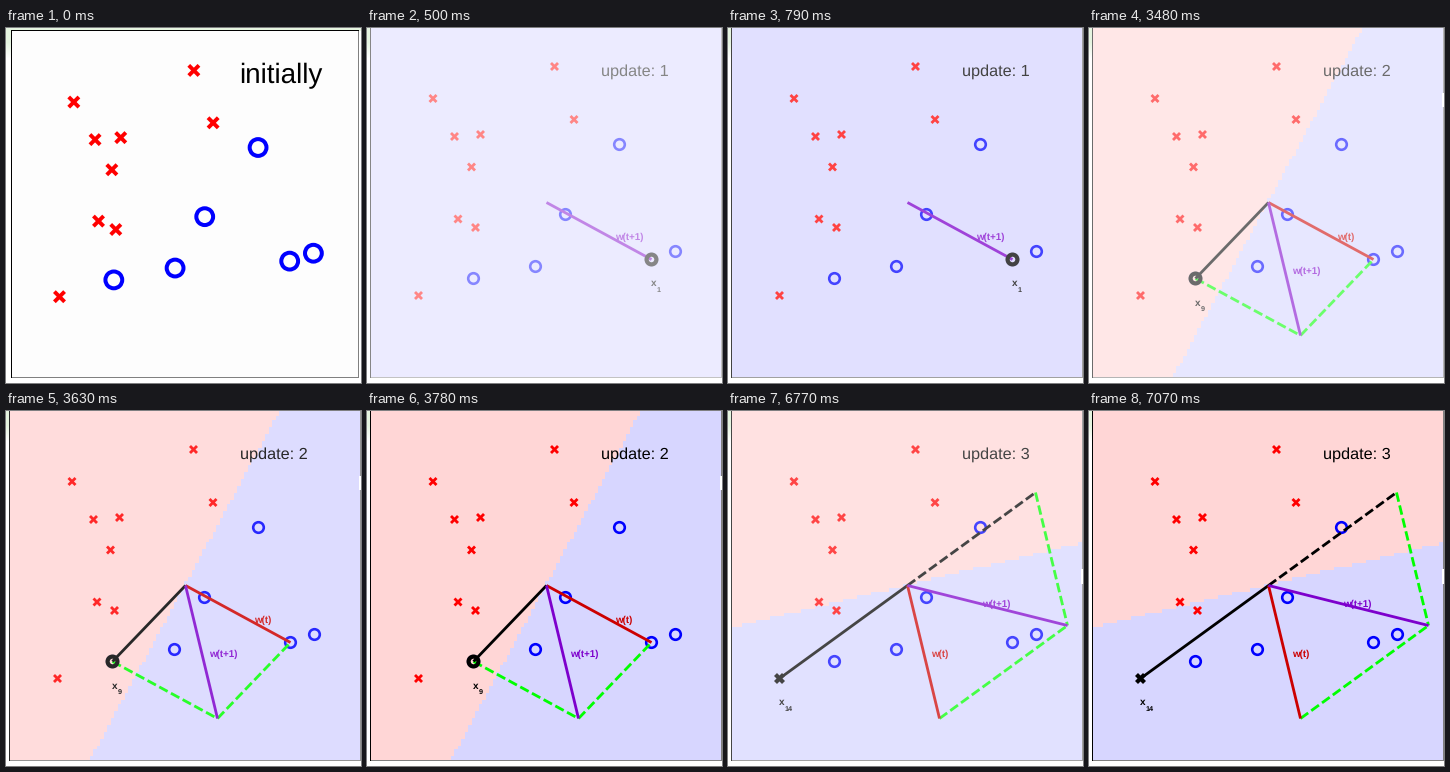
A matplotlib script that plays this animation: 355x355 px, repeating every 8000 ms.

```python
import numpy as np
import matplotlib.pyplot as plt
from matplotlib.animation import FuncAnimation
from matplotlib.collections import LineCollection, EllipseCollection
from matplotlib.patches import Rectangle

plt.rcParams["text.hinting"] = "none"

SIZE, DPI, STEP, LOOP = 355, 71, 20, 8000
PT = 72 / DPI
LINE = 2.8

RED, BLUE, GREEN, BLACK, GREY = "#ff0000", "#0000ff", "#00ff00", "#000000", "#808080"
OLD_W, NEW_W = "#cc0000", "#7d00cc"
MINT = np.array([0.9, 0.96, 0.88])
PINK_AREA, BLUE_AREA = (1, 0.843, 0.843), (0.845, 0.843, 1)

# training samples of the two classes
CROSSES = np.array([(187, 38), (65.5, 70), (87, 108), (113, 106), (104, 138.5),
                    (90.5, 190.5), (108, 199), (206.5, 91), (51, 267)])
RINGS = np.array([(252, 116), (198, 186), (168, 238), (106, 250), (284, 231), (308, 223)])

# perceptron updates: add a misclassified ring, subtract a misclassified cross
ORIGIN = np.array([179, 174])
X1, X9, X14 = RINGS[4], RINGS[3], CROSSES[-1]
W1 = X1
W2 = W1 + X9 - ORIGIN
FLIP14 = 2 * ORIGIN - X14
W3 = W2 + FLIP14 - ORIGIN

# first moment and opacity of each update; the fade climbs in even ticks
FADES = [(500, 0.47), (3480, 0.575), (6620, 0.46)]
TICK, RISE = 150, 0.265

fig = plt.figure(figsize=(SIZE / DPI, SIZE / DPI), dpi=DPI, facecolor="white")
ax = fig.add_axes([0, 0, 1, 1])
ax.set_axis_off()
scenes = [[], [], [], []]


def box(k, x0, y0, x1, y1, color, z=0):
    patch = Rectangle((x0 - 0.5, y0 - 0.5), x1 - x0, y1 - y0, fc=color, lw=0,
                      antialiased=False, zorder=z)
    ax.add_patch(patch)
    if k is not None:
        scenes[k].append(patch)
    return patch


def border(k, left, top, right, bottom=349):
    box(k, left, bottom, right + 1, bottom + 1, GREY, 2)
    box(k, right, top, right + 1, bottom + 1, GREY, 2)
    box(k, left, top, left + 1, bottom + 1, BLACK, 2)


def crosses(k, points, r, width, color=RED, z=3):
    arms = [np.array([(-r, -r), (r, r)]), np.array([(-r, r), (r, -r)])]
    scenes[k].append(ax.add_collection(LineCollection(
        [p + arm for p in points for arm in arms], colors=color,
        linewidths=width * PT, capstyle="butt", zorder=z)))


def rings(k, points, r, width, color=BLUE, z=3):
    d = [2 * r] * len(points)
    scenes[k].append(ax.add_collection(EllipseCollection(
        d, d, [0] * len(points), units="xy", offsets=points,
        offset_transform=ax.transData, facecolors="none", edgecolors=color,
        linewidths=width * PT, zorder=z)))


def line(k, a, b, color, dashed=False):
    style = (0, (9.5 / LINE, 3.8 / LINE)) if dashed else "-"
    scenes[k] += ax.plot(*zip(a, b), color=color, lw=LINE * PT, ls=style, zorder=4,
                         solid_capstyle="butt", dash_capstyle="butt")


def label(k, x, y, text, size, color=BLACK, weight="bold"):
    scenes[k].append(ax.text(x, y, text, fontsize=size * PT, color=color,
                             family="Liberation Sans", weight=weight,
                             va="baseline", ha="left", zorder=6))


def sample_name(k, point, index):
    x, y = point + (-0.5, 27)
    label(k, x, y, "x", 10)
    label(k, x + 5.8, y + 5.3, index, 7.3)


def weight_vector(k, tip, place, text, color):
    line(k, ORIGIN, tip, color)
    label(k, *place, text, 9.7, color)


def area(k, normal=None, cells=100):
    pitch = 351 / cells
    centers = (np.arange(cells) + 0.5) * pitch
    gx, gy = np.meshgrid(centers + 3, centers - 2)
    if normal is None:
        inside = np.ones_like(gx, bool)
    else:
        nx, ny = normal - ORIGIN
        inside = (gx - ORIGIN[0]) * nx + (gy - ORIGIN[1]) * ny > 0
    rgb = np.where(inside[..., None], BLUE_AREA, PINK_AREA)
    scenes[k].append(ax.imshow(rgb, extent=(2.5, 353.5, 348.5, -2.5), aspect="auto",
                               interpolation="nearest", zorder=1))


def update_scene(k, normal=None):
    area(k, normal)
    border(k, 3, 0, 354)
    crosses(k, CROSSES, 3.5, 2.8)
    rings(k, RINGS, 5.3, 2.6)
    label(k, 234, 47, f"update: {k}", 16.2, weight="normal")


# pale green corner fading downwards
fade = np.clip((np.arange(31) - 14) / 16, 0, 1)[:, None, None]
ax.imshow(MINT + (1 - MINT) * fade, extent=(-0.5, 5.5, 30.5, -0.5), aspect="auto", zorder=0)

# initial scene: the same samples, slightly shrunk
box(0, 3, 0, SIZE, 3, MINT)
box(0, 5, 2, 353, 350, "#fdfdfd", 1)
border(0, 5, 2, 352)
box(0, 5, 2, 353, 3, BLACK, 2)
shrink = lambda points: points * 0.988 + (2.6, 4.4)
crosses(0, shrink(CROSSES), 5.1, 3.9)
rings(0, shrink(RINGS), 8.4, 4)
label(0, 233, 54.5, "initially", 27.8, weight="normal")

V1, V2, V3 = (248, 211), (203, 245), (254, 195)

# first update
update_scene(1)
weight_vector(1, W1, V1, "w(t+1)", NEW_W)
rings(1, [X1], 4.9, 4.2, BLACK, 5)
sample_name(1, X1, "1")

# second update
update_scene(2, W1)
box(2, 353, 65, 355, 79, "white", 3)
line(2, X9, W2, GREEN, True)
line(2, W2, W1, GREEN, True)
line(2, ORIGIN, X9, BLACK)
weight_vector(2, W1, V1, "w(t)", OLD_W)
weight_vector(2, W2, V2, "w(t+1)", NEW_W)
rings(2, [X9], 4.9, 4.2, BLACK, 5)
sample_name(2, X9, "9")

# third update
update_scene(3, W2)
box(3, 353, 158, 355, 173, "white", 3)
line(3, FLIP14, W3, GREEN, True)
line(3, W2, W3, GREEN, True)
line(3, ORIGIN, X14, BLACK)
line(3, ORIGIN, FLIP14, BLACK, True)
weight_vector(3, W2, V2, "w(t)", OLD_W)
weight_vector(3, W3, V3, "w(t+1)", NEW_W)
crosses(3, [X14], 4, 4.2, BLACK, 5)
sample_name(3, X14, "14")

veil = box(None, 3, 0, SIZE, 350, "white", 10)
ax.set_xlim(-0.5, SIZE - 0.5)
ax.set_ylim(SIZE - 0.5, -0.5)


def draw(i):
    t = i * STEP + STEP / 2
    current, opacity = 0, 1
    for k, (start, first) in enumerate(FADES, 1):
        if t >= start:
            current, opacity = k, min(1, first + RISE * ((t - start) // TICK))
    for k, parts in enumerate(scenes):
        for part in parts:
            part.set_visible(k == current)
    veil.set_alpha(1 - opacity)
    return []


anim = FuncAnimation(fig, draw, frames=LOOP // STEP, interval=STEP,
                     init_func=lambda: draw(0), repeat=True, repeat_delay=0)
plt.show()
```
